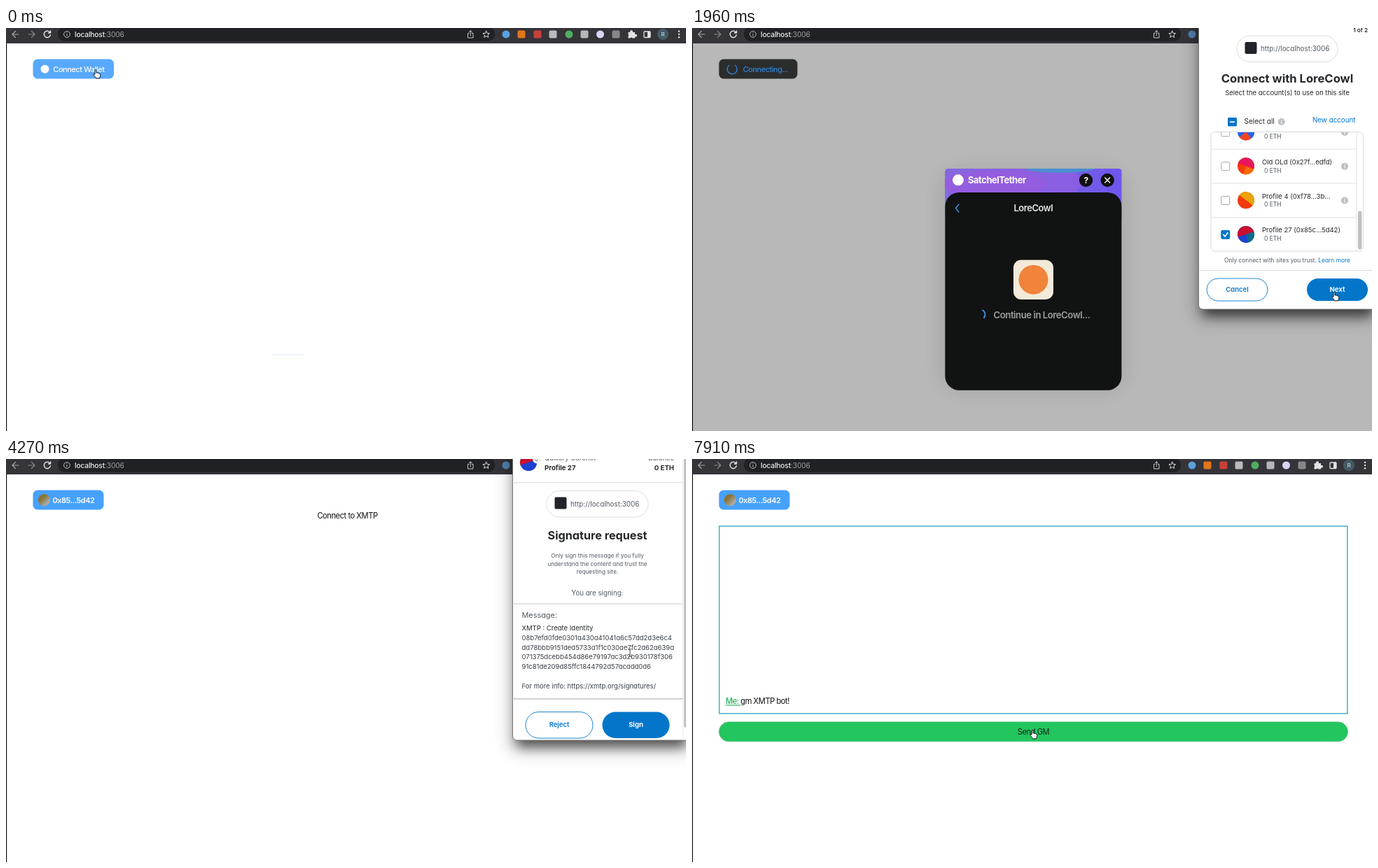
Recreate the animation shown at these times as an HTML page. Size 971 by 576 pixels, loop 8 s.

```html
<!DOCTYPE html>
<html lang="en">
<head>
<meta charset="utf-8">
<title>Wallet sign-in</title>
<style>
html,body{margin:0;width:100%;height:100%;overflow:hidden;background:#fff}
svg{display:block;width:971px;height:576px;font-family:Inter,"Open Sans",sans-serif}
text{white-space:pre}
.ui{letter-spacing:-.03em}
.pop{font-feature-settings:"cv11"}
</style>
</head>
<body>
<svg id="stage" viewBox="0 0 971 576" xmlns="http://www.w3.org/2000/svg"></svg>
<script>
const LOOP = 8000;
const BLUE = '#0376c9', INK = '#24272a', GREY = '#535a61', LINE = '#d6d9dc', ORANGE = '#f0843a';

const text = (x, y, s, size, fill = INK, weight = 400, anchor = 'start') =>
  `<text x="${x}" y="${y}" font-size="${size}" fill="${fill}" font-weight="${weight}" text-anchor="${anchor}">${s}</text>`;
const mid = (x, y, s, size, fill, weight) => text(x, y, s, size, fill, weight, 'middle');
const box = (x, y, w, h, r, fill, more = '') =>
  `<rect x="${x}" y="${y}" width="${w}" height="${h}" rx="${r}" fill="${fill}" ${more}/>`;
const dot = (x, y, r, fill, more = '') => `<circle cx="${x}" cy="${y}" r="${r}" fill="${fill}" ${more}/>`;
const line = (d, stroke, w = 1) =>
  `<path d="${d}" fill="none" stroke="${stroke}" stroke-width="${w}" stroke-linecap="round" stroke-linejoin="round"/>`;
const group = (id, body, more = '') => `<g id="${id}" ${more}>${body}</g>`;

const avatar = (x, y, r, base, half, quarter, turn) =>
  `<g transform="translate(${x} ${y}) rotate(${turn}) scale(${r})">${dot(0, 0, 1, base)}
  <path d="M-1 0A1 1 0 0 1 1 0Z" fill="${half}"/><path d="M0 0L1 0A1 1 0 0 1 0 1Z" fill="${quarter}"/></g>`;
const info = (x, y) => dot(x, y, 5, '#bbc0c5') + box(x - .6, y - .8, 1.2, 3.6, 0, '#fff') + dot(x, y - 2.2, .8, '#fff');
const outline = `stroke="${BLUE}" stroke-width=".9"`;
const pair = (x1, x2, y, w, h, no, yes) =>
  box(x1, y, w, h, h / 2, '#fff', outline) + mid(x1 + w / 2, y + h / 2 + 3.1, no, 9.5, BLUE, 600) +
  box(x2, y, w, h, h / 2, BLUE) + mid(x2 + w / 2, y + h / 2 + 3.1, yes, 9.5, '#fff', 700);
const site = (x, y, w) =>
  box(x, y, w, 37.5, 18.7, '#fff', `stroke="${LINE}" stroke-width=".9"`) +
  box(x + 11.5, y + 9, 17, 17, 2, '#20232a') + text(x + 34, y + 22, 'http://localhost:3006', 9.9, GREY);

function toolbar() {
  const apps = [[714, '#5aa0dc'], [736, '#e2761b', 1], [759, '#c8403a', 1], [781, '#b9babd', 1], [804, '#4fae62'],
    [826, '#b4b6b9', 1], [848.5, '#d9d5f4'], [871, '#85878b', 1]];
  const marks = apps.map(([x, c, sq]) => sq ? box(x - 5.5, 3.5, 11, 11, 2, c) : dot(x, 9, 5.5, c)).join('');
  const puzzle = '<path d="M888.5 6H891.2A2 2 0 1 1 894.8 6H898V9A2 2 0 1 1 898 12.4V14.5H894.6A1.9 1.9 0 0 0 891.4 14.5H888.5V11.6A1.8 1.8 0 0 0 888.5 8.8Z" fill="#e2e3e5"/>';
  const right = marks + puzzle + box(911, 5, 9, 8.5, 1, 'none', 'stroke="#e2e3e5" stroke-width="1.3"') +
    box(916, 5, 4, 8.5, 0, '#e2e3e5') + dot(938, 9, 8, '#445b66') + mid(938, 12, 'R', 8, '#dfe6e9') +
    [4.8, 9, 13.2].map(y => dot(961, y, 1.2, '#dfe1e4')).join('');
  return box(0, 0, 971, 22, 0, '#353439') + box(74, -2, 624, 21, 10, '#202124') +
    line('M18 9H9M13.5 4.5L9 9L13.5 13.5', '#a5a6a9', 1.2) + line('M32 9H41M36.5 4.5L41 9L36.5 13.5', '#85868a', 1.2) +
    line('M62.5 6A4.6 4.6 0 1 0 63.4 10M63.6 4V7H60.6', '#e4e5e7', 1.4) +
    dot(87, 9, 4.4, 'none', 'stroke="#b9bbbe"') + line('M87 8.7V11.2M87 6.6V6.7', '#b9bbbe', 1) +
    `<text x="98" y="12.7" font-size="10.3" letter-spacing="-.2" fill="#eceded" font-weight="500">localhost<tspan fill="#9aa0a6" font-weight="400">:3006</tspan></text>` +
    line('M661 7.5H659.5V14H667V7.5H665.5M663.3 11V4M661.2 5.8L663.3 3.8L665.4 5.8', '#c9cacd') +
    line('M685.7 4.2L687.1 7.4L690.5 7.7L687.9 10L688.7 13.4L685.7 11.6L682.7 13.4L683.5 10L680.9 7.7L684.3 7.4Z', '#dadbdd') +
    group('tools', right) +
    group('badge', box(737, 10, 9, 9, 2, '#1a7fd4') + mid(741.5, 17.2, '1', 7.5, '#fff', 600));
}

function page() {
  return group('idle', box(38.5, 44.5, 115.5, 28, 6.5, '#58a9fb') + dot(55.5, 58.8, 6, '#fff') +
      text(67.3, 62.8, 'Connect Wallet', 11, '#fff', 500) + box(380, 466.5, 45, 1.2, 0, '#e6f0fb'), 'class="ui"') +
    group('ask', mid(487.5, 85.2, 'Connect to XMTP', 11.2, '#111'), 'class="ui"') +
    group('chat', box(39, 96, 896.8, 267.8, 0, '#fff', 'stroke="#27a3c0" stroke-width="1.3"') +
      box(38.5, 375.8, 898, 28, 14, '#22c55e', 'stroke="#55bd7b" stroke-width=".6"') +
      mid(487.5, 393.8, 'Send GM', 11.2, '#16261b') +
      group('msg', `<text x="48" y="350.3" font-size="11.2" fill="#111"><tspan fill="#24b257" font-weight="500" text-decoration="underline">Me: </tspan>gm XMTP bot!</text>`), 'class="ui"') +
    '<rect id="shade" y="22" width="971" height="554" fill="#000"/>' +
    group('busy', box(38.5, 44.5, 112, 28, 6.5, '#2b2d2d') + '<path id="spin1" fill="none" stroke="#2f86d8" stroke-width="1.4" stroke-linecap="round"/>' +
      text(72.7, 62.8, 'Connecting...', 11, '#2f86d8', 500), 'class="ui"') +
    group('linked', box(38.5, 44.5, 101, 28, 6.5, '#47a1ff') + dot(54.5, 58.6, 8.7, 'url(#face)') +
      text(66.5, 62.8, '0x85...5d42', 11, '#fff', 600), 'class="ui"') +
    box(0, 22, 1.2, 554, 0, '#111');
}

function modal() {
  const head = '<g clip-path="url(#band)">' + box(361, 0, 253, 70, 0, 'url(#sky)') +
    '<ellipse id="blob1" rx="75" ry="19" fill="#b552cf"/><ellipse id="blob2" rx="115" ry="40" fill="#8f5fe2"/>' +
    '<ellipse id="blob3" rx="52" ry="8" fill="#4a8fce"/></g>';
  const bar = dot(380, 16.3, 8, '#fff') + text(394, 21, 'SatchelTether', 13, '#fff', 700) +
    dot(562.5, 16.5, 9.7, '#111') + mid(562.5, 20.8, '?', 12, '#fff', 700) +
    dot(593.2, 16.5, 9.7, '#111') + line('M589.8 13.1L596.6 19.9M596.6 13.1L589.8 19.9', '#fff', 1.4);
  const list = mid(487.5, 61, 'Connect your wallet', 13, '#e4e7e7', 600) +
    box(380, 317, 45, 45, 12, ORANGE) + mid(402.5, 376, 'LoreCowl', 8.4, '#e4e7e7', 500);
  const wait = line('M381 51L376.5 56.5L381 62', '#3b8fe0', 1.5) + mid(487.3, 61, 'LoreCowl', 13, '#e4e7e7', 600) +
    box(459, 130.5, 57, 56.5, 11, '#f3ead9') + dot(487.5, 158.7, 21, ORANGE) +
    '<path id="spin2" fill="none" stroke="#3b8fe0" stroke-width="1.9"/>' +
    mid(499.5, 213.5, 'Continue in LoreCowl...', 13.2, '#9a9f9f', 600);
  return group('modal', '<rect id="glow" x="348" width="278" rx="44" fill="#000" opacity=".06" filter="url(#soft)"/>' +
    group('top', head + bar) + '<rect id="panel" x="361.4" width="252" rx="20" fill="#111212"/>' +
    group('list', list) + group('wait', wait), 'class="ui"');
}

function accounts() {
  const rows = [['Profile 23 (0x4b1...90ce)', '#2a62e8', '#2a62e8', '#f5431f', 50],
    ['Old OLd (0x27f...edfd)', '#f83a05', '#e8175d', '#fb6a0c', 20],
    ['Profile 4 (0xf78...3b...', '#f23a10', '#eaa308', '#f23a10', 38],
    ['Profile 27 (0x85c...5d42)', '#1a42d0', '#c8102e', '#0c6a8a', -18]];
  const list = rows.map(([name, a, b, c, turn], i) => {
    const y = 295.3 - (3 - i) * 48.8, on = i === 3;
    return box(755.8, y - 6, 12, 12, 1.5, on ? BLUE : '#fff', `stroke="${on ? BLUE : '#9fa6ae'}"`) +
      (on ? line(`M758.8 ${y}L761 ${y + 2.6}L765 ${y - 2.6}`, '#fff', 1.6) : info(932, y)) +
      avatar(791, y - .3, 12, a, b, c, turn) + text(814, y - 3, name, 9.5) + text(817, y + 8.9, '0 ETH', 8.5, GREY) +
      line(`M741 ${y + 24.3}H949`, LINE, .8);
  }).join('');
  return text(965, 6, '1 of 2', 8.2, INK, 600, 'end') + site(778, 11, 144) +
    mid(850, 77.5, 'Connect with LoreCowl', 16.6, INK, 700) +
    mid(850, 95.6, 'Select the account(s) to use on this site', 9.5) +
    box(765, 128, 13, 12.6, 1.5, BLUE) + box(768, 133.4, 7, 1.8, 0, '#fff') + text(788.5, 136.6, 'Select all', 10) +
    info(841.7, 134) + text(947.5, 135.2, 'New account', 9.8, BLUE, 400, 'end') +
    `<g clip-path="url(#rows)">${list}</g>` + box(741, 148.5, 217.5, 170.5, 6, 'none', `stroke="${LINE}"`) +
    line('M949 149V319', LINE, .8) + box(951, 261.5, 5.4, 55, 2.7, '#c0c0c2') +
    `<text x="850" y="335" font-size="8.4" fill="${GREY}" text-anchor="middle">Only connect with sites you trust. <tspan fill="${BLUE}">Learn more</tspan></text>` +
    line('M724 346.5H976', LINE) + pair(735, 878, 358, 87, 32, 'Cancel', 'Next');
}

function permit() {
  return text(965, 6, '2 of 2', 8.2, INK, 600, 'end') + site(778, 11, 144) +
    mid(850, 77.5, 'Connect to Profile 27', 16.4, INK, 700) + mid(850, 131, 'Allow this site to:', 9.5) +
    line('M756 161L759 164L764 158', BLUE, 1.6) +
    text(775, 160, 'See address, account balance, activity', 9) + text(775, 172, 'and suggest transactions to approve', 9) +
    mid(850, 335, 'Only connect with sites you trust.', 8.4, GREY) +
    line('M724 346.5H976', LINE) + pair(735, 878, 358, 87, 32, 'Back', 'Connect');
}

function signing() {
  const hash = ['08b7efd0fde0301a430a41041a6c57dd2d3e6c4', 'dd78bbb9151ded5733a1f1c030ae7fc2d62a639a',
    '071375dcebb454d86e79197ac3d2b930178f306', '91c81de209d85ffc1844792d57acadd0d6'];
  const flip = s => [...s].reverse().join('');
  const lines = (f, s) => text(736.5, 245, `XMTP : ${s} Identity`, 9.5) +
    hash.map((h, i) => text(736.5, 258.8 + i * 13.8, f(h), 9.5, '#3a3f44')).join('');
  return avatar(746, 5, 12, '#1a42d0', '#c8102e', '#1a42d0', -18) + dot(757.5, 1, 5, '#fff', `stroke="${LINE}"`) +
    mid(757.5, 3.4, 'Q', 6.5, GREY) + text(769, 2.3, 'Quillory Corenet', 9.5, GREY) + text(769, 16, 'Profile 27', 9.6, INK, 700) +
    text(954, 2.3, 'Balance', 9.5, GREY, 400, 'end') + text(954, 16, '0 ETH', 9.6, INK, 700, 'end') +
    line('M724 33.7H966', LINE) + site(772, 45.5, 145) + mid(844.5, 115, 'Signature request', 16.2, INK, 700) +
    ['Only sign this message if you fully', 'understand the content and trust the', 'requesting site.']
      .map((s, i) => mid(844.5, 141 + i * 11.6, s, 8.2, GREY)).join('') +
    mid(844.5, 194.6, 'You are signing:', 9.7, GREY) + line('M724 207H966', '#c4c7ca') +
    text(736.5, 227.3, 'Message:', 10.9, GREY) +
    group('create', lines(s => s, 'Create')) + group('enable', lines(flip, 'Enable')) +
    text(736.5, 328, 'For more info: https://xmtp.org/signatures/', 9.5, '#3a3f44') +
    line('M724 342.7H966', '#bfc2c5', 1.4) + pair(742, 851.5, 361.5, 96, 37.5, 'Reject', 'Sign') +
    line('M966.5 -12V402', '#e6e6e6', .8) + box(968, -12, 6, 396, 3, '#c1c1c3');
}

function popup() {
  return group('popup', box(715, -24, 269, 446, 18, '#000', 'opacity=".15" filter="url(#soft)"') +
    box(728, -16, 244, 428, 10, '#000', 'opacity=".6" filter="url(#near)"') +
    box(723.5, -32, 253, 434, 6, '#fff', 'stroke="#6d6d6d" stroke-width=".9"') +
    '<path d="M723.5 -12V-26A6 6 0 0 1 729.5 -32H970.5A6 6 0 0 1 976.5 -26V-12Z" fill="#4c4a4b"/>' +
    ['#ed6a5e', '#f4bf4f', '#61c554'].map((c, i) => dot(733 + i * 14, -22, 4.6, c)).join('') +
    group('load', dot(850, 154, 52, ORANGE) + '<path id="spin3" fill="none" stroke="#f0583a" stroke-width="2.4"/>') +
    group('pick', accounts()) + group('permit', permit()) + group('sign', signing()), 'class="pop"');
}

const pointers = {
  arrow: '<path d="M0 0V10.5L2.5 8.3L4.2 12L5.9 11.2L4.3 7.7H7.6Z" transform="translate(0 -5.5)" fill="#000" stroke="#fff" stroke-width=".9"/>',
  hand: '<path d="M-3 -5.5C-3 -7 -1 -7 -1 -5.5V-1.8C0 -2.6 1 -2.2 1.2 -1.4C2.2 -2 3 -1.5 3.1 -.7C4.2 -1 4.8 -.4 4.8 .6C4.8 3 4 3.6 3.8 5.8H-1.4C-2 3.8 -5 1.8 -5 .4C-5 -.6 -3.8 -.5 -3 .4Z" fill="#fff" stroke="#111" stroke-width="1"/>',
  beam: line('M-2 -5.5C-.6 -5.5 0 -5 0 -4.3C0 -5 .6 -5.5 2 -5.5M0 -4.3V4.3M-2 5.5C-.6 5.5 0 5 0 4.3C0 5 .6 5.5 2 5.5', '#333', .9)
};

document.getElementById('stage').innerHTML = `<defs>
<linearGradient id="face" x2="1" y2="1"><stop offset=".35" stop-color="#8a7436"/><stop offset=".75" stop-color="#a7aaa6"/></linearGradient>
<linearGradient id="sky"><stop offset="0" stop-color="#4fa3c6"/><stop offset=".45" stop-color="#7d68dc"/><stop offset="1" stop-color="#6d55ee"/></linearGradient>
<filter id="soft" x="-40%" y="-40%" width="180%" height="180%"><feGaussianBlur stdDeviation="11"/></filter>
<filter id="near" x="-20%" y="-20%" width="140%" height="140%"><feGaussianBlur stdDeviation="8"/></filter>
<clipPath id="band"><path d="M361.4 70V4A4 4 0 0 1 365.4 0H609.4A4 4 0 0 1 613.4 4V70Z"/></clipPath>
<clipPath id="rows"><rect x="741" y="148.5" width="217" height="170.5"/></clipPath></defs>
<rect width="971" height="576" fill="#fff"/>` + page() + modal() + toolbar() + popup() +
  group('pointer', Object.entries(pointers).map(([k, v]) => group(k, v)).join(''));

const el = id => document.getElementById(id);
const set = (id, attrs) => { for (const k in attrs) el(id).setAttribute(k, attrs[k]); };
const show = (id, on) => set(id, { display: on ? 'inline' : 'none' });
const ramp = (t, a, b) => Math.min(1, Math.max(0, (t - a) / (b - a)));
const smooth = p => p * p * (3 - 2 * p);

function arc(id, x, y, r, start, sweep) {
  const at = deg => { const a = deg * Math.PI / 180; return `${x + r * Math.cos(a)} ${y + r * Math.sin(a)}`; };
  set(id, { d: `M${at(start)}A${r} ${r} 0 ${sweep > 180 ? 1 : 0} 1 ${at(start + sweep)}` });
}

// time, x, y, pointer shape
const path = [[0, 130, 66, 'hand'], [140, 130, 66, 'arrow'], [420, 401, 485, 'hand'], [660, 400, 490, 'arrow'],
  [820, 398.5, 543, 'arrow'], [1050, 398.5, 543, 'arrow'], [1500, 919, 384, 'hand'], [2590, 919, 384, 'arrow'],
  [3080, 461, 82, 'hand'], [3150, 461, 82, 'hand'], [3360, 484, 90, 'hand'], [3500, 476, 89, 'hand'],
  [3800, 476, 89, 'arrow'], [4130, 891, 270, 'beam'], [4270, 891, 277, 'beam'], [4410, 899, 381, 'hand'],
  [5400, 899, 381, 'arrow'], [5810, 914.5, 363.5, 'arrow'], [5900, 914.5, 363.5, 'arrow'], [6160, 528, 330, 'arrow'],
  [6370, 528, 330, 'arrow'], [6440, 462, 478, 'arrow'], [6580, 462, 478, 'arrow'], [6930, 489, 393, 'hand'],
  [7700, 489, 393, 'hand'], [7840, 488, 394, 'hand']];

// opens, content ready, closes
const windows = [[800, 1050, 2590], [3800, 4040, 4490], [4690, 4900, 5400]];

function movePointer(t) {
  let i = path.length - 1;
  while (path[i][0] > t) i--;
  const a = path[i], b = path[i + 1] || a;
  const p = smooth(ramp(t, a[0], b === a ? LOOP : b[0]));
  set('pointer', { transform: `translate(${a[1] + (b[1] - a[1]) * p} ${a[2] + (b[2] - a[2]) * p})` });
  for (const k in pointers) show(k, k === a[3]);
}

function drawModal(t) {
  show('modal', t > 140 && t < 2800);
  const p = ramp(t, 700, 990), top = 150 + 51 * p * (2 - p), height = 718.7 - 2 * top;
  set('modal', { opacity: ramp(t, 140, 320) * (1 - ramp(t, 2590, 2780)) });
  for (const id of ['top', 'list', 'wait']) set(id, { transform: `translate(0 ${top})` });
  set('glow', { y: top - 6, height: height + 14 });
  set('panel', { y: top + 34, height: height - 34 });
  set('list', { opacity: 1 - ramp(t, 690, 780) });
  set('wait', { opacity: ramp(t, 770, 960) });
  const q = (t - 840) / 1120;
  set('blob1', { cx: 455 - 25 * q, cy: 18 + 4 * q });
  set('blob2', { cx: 440, cy: 20, opacity: Math.min(.85, Math.max(0, q)) });
  set('blob3', { cx: 555 - 30 * q, cy: -2 });
  arc('spin1', 57.3, 58.8, 7, 130 + (t - 840) * 360 / 747, 280);
  const sweep = 75 - 35 * Math.cos((t - 840) / 2240 * 2 * Math.PI);
  arc('spin2', 411.5, 208.5, 7, 50 + (t - 840) * 360 / 1344 - sweep / 2, sweep);
}

function drawPopup(t) {
  const n = windows.findIndex(w => t >= w[0] && t < w[2] + 100), w = windows[n];
  show('popup', n >= 0);
  set('tools', { opacity: n >= 0 ? .72 : 1 });
  show('badge', n >= 0);
  if (n < 0) return;
  const p = ramp(t, w[0], w[0] + 200), s = .506 + .494 * smooth(p), ready = t >= w[1];
  set('popup', {
    transform: `translate(849.5 185) scale(${s}) translate(-849.5 -185)`,
    opacity: Math.min(1, 3 * p) * (1 - ramp(t, w[2], w[2] + 100))
  });
  show('load', !ready);
  show('pick', ready && n === 0 && t < 2070);
  show('permit', ready && n === 0 && t >= 2070);
  show('sign', ready && n > 0);
  show('create', n === 1);
  show('enable', n === 2);
  arc('spin3', 849.5, 233, 8, t * .5 - 100, 270);
}

function draw(t) {
  show('idle', t < 110);
  show('busy', t >= 110 && t < 2450);
  show('linked', t >= 2450);
  show('ask', t >= 2520 && t < 5560);
  show('chat', t >= 5560);
  show('msg', t >= 7280);
  set('shade', { opacity: .28 * ramp(t, 110, 310) * (1 - ramp(t, 2590, 2800)) });
  drawModal(t);
  drawPopup(t);
  movePointer(t);
}

const begin = performance.now();
function tick() {
  draw((performance.now() - begin) % LOOP);
  requestAnimationFrame(tick);
}
tick();
</script>
</body>
</html>
```
